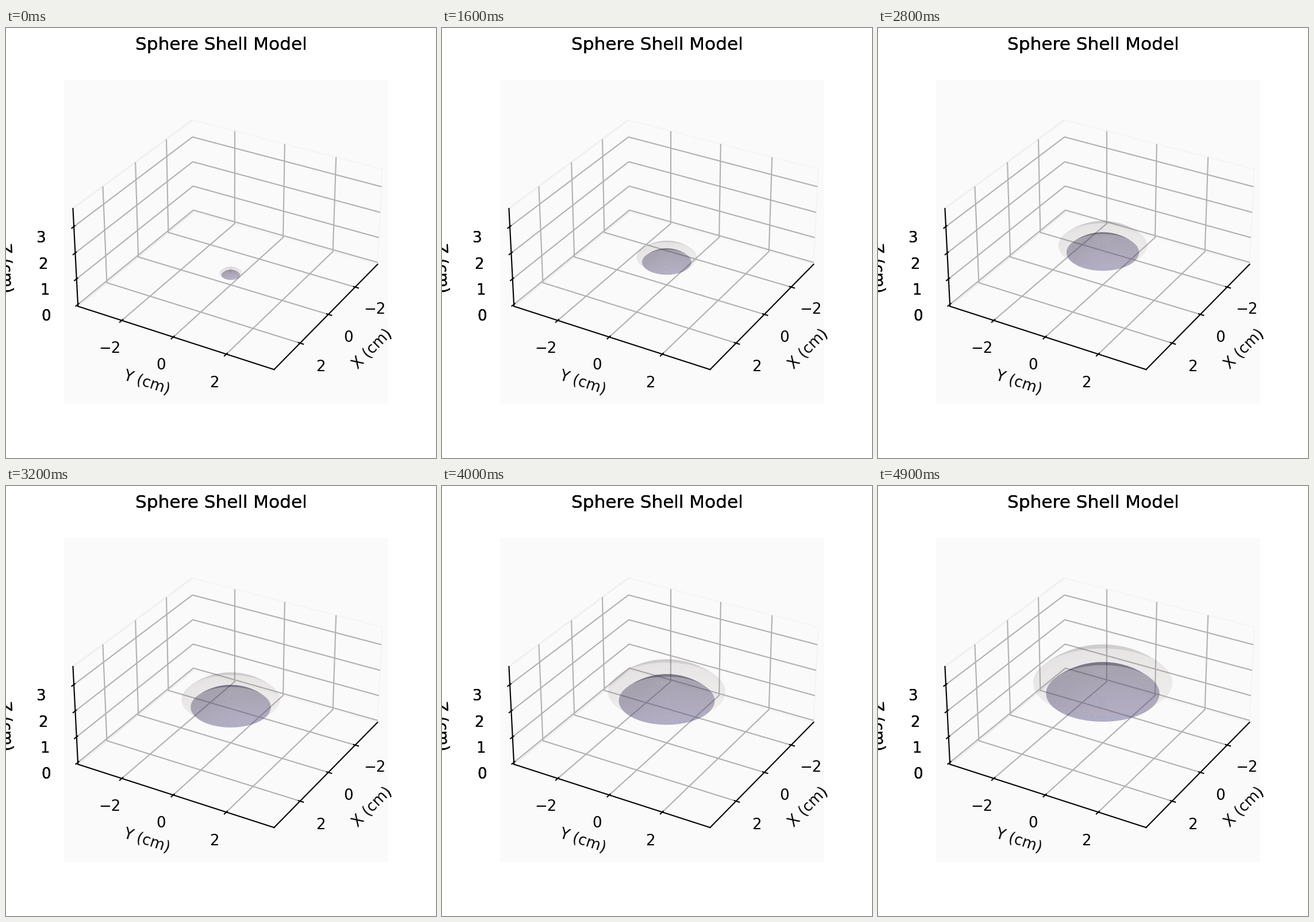
These frames come from a looping animation (748 by 748 pixels, 5000 ms). A matplotlib script:

```python
import matplotlib.pyplot as plt
import numpy as np
from matplotlib.animation import FuncAnimation
from mpl_toolkits.mplot3d.art3d import Poly3DCollection

SIZE, DPI = 748, 187
FRAMES, INTERVAL = 50, 100
LEFT, BOTTOM, SIDE = 101.25, 94.0, 564.2
HALF_RANGE, MARGIN = 3.75, 0.075
OVERPRINTS = 2

plt.rcParams["font.family"] = "DejaVu Sans"
fig = plt.figure(figsize=(SIZE / DPI, SIZE / DPI), dpi=DPI, facecolor="white")


def make_axes(zorder):
    rect = [LEFT / SIZE, BOTTOM / SIZE, SIDE / SIZE, SIDE / SIZE]
    ax = fig.add_axes(rect, projection="3d", facecolor="#fafafa",
                      zorder=zorder, label=f"layer {zorder}")
    ax.set_box_aspect((2, 2, 1))
    ax.view_init(elev=30, azim=30)
    ax.set(xlabel="X (cm)", ylabel="Y (cm)", zlabel="Z (cm)",
           xticks=[-2, 0, 2], yticks=[-2, 0, 2], zticks=[0, 1, 2, 3])
    ax.set_xlim(-HALF_RANGE, HALF_RANGE)
    ax.set_ylim(-HALF_RANGE, HALF_RANGE)
    ax.set_zlim(-MARGIN, HALF_RANGE - MARGIN)
    for axis in (ax.xaxis, ax.yaxis, ax.zaxis):
        axis.pane.set_fill(False)
    return ax


def cap_quads(count=50, max_polar=np.pi / 4):
    """Quads of a unit spherical cap around the z axis."""
    azimuth, polar = np.meshgrid(np.linspace(0, 2 * np.pi, count),
                                 np.linspace(0, max_polar, count))
    p = np.stack([np.sin(polar) * np.cos(azimuth),
                  np.sin(polar) * np.sin(azimuth),
                  np.cos(polar)], axis=-1)
    corners = [p[:-1, :-1], p[:-1, 1:], p[1:, 1:], p[1:, :-1]]
    return np.stack(corners, axis=2).reshape(-1, 4, 3)


def add_cap(ax, rgb, alpha):
    color = tuple(c / 255 for c in rgb) + (alpha,)
    cap = Poly3DCollection(QUADS, facecolors=color, alpha=alpha,
                           linewidths=1.0, shade=True)
    ax.add_collection3d(cap)
    return cap


# Overprinted layers make the lettering outside the plot square heavier.
layers = [make_axes(z) for z in range(OVERPRINTS + 1)]
for _ in layers:
    fig.text(0.5, 0.98, "Sphere Shell Model", size=12, ha="center", va="top")

QUADS = cap_quads()
RADII = np.linspace(0.5, 3, FRAMES)
inner = add_cap(layers[-1], (75, 65, 150), 0.4)
outer = add_cap(layers[-1], (253, 226, 223), 0.15)


def update(frame):
    radius = RADII[frame]
    inner.set_verts(QUADS * (0.9 * radius))
    outer.set_verts(QUADS * (1.1 * radius))
    return inner, outer


animation = FuncAnimation(fig, update, frames=FRAMES, interval=INTERVAL,
                          repeat=True, blit=False)
plt.show()
```
